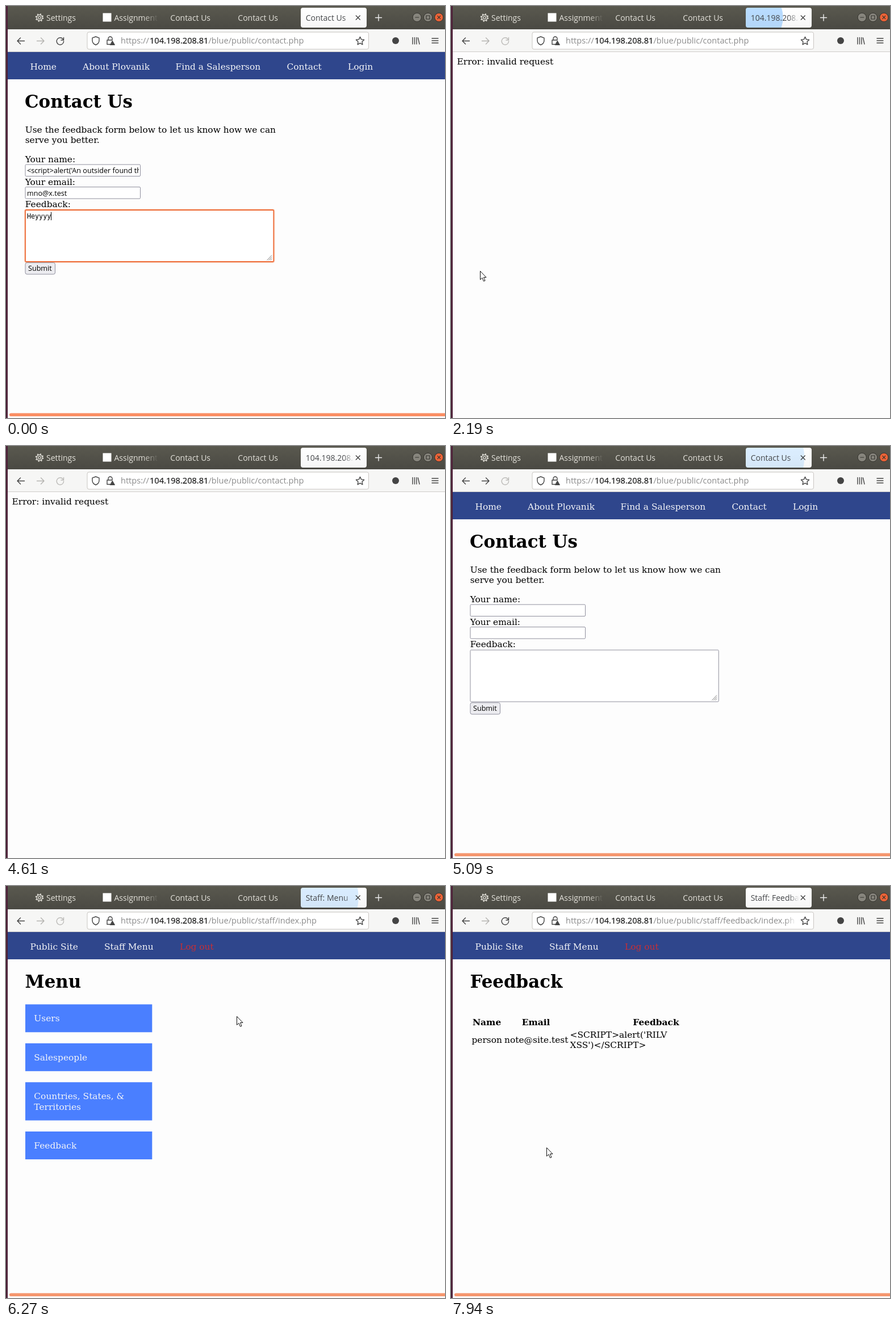
An HTML page for the animation above (8 s loop, 773 by 725 pixels).

```html
<!DOCTYPE html>
<html lang="en">
<head>
<meta charset="utf-8">
<title>Contact form</title>
<style>
  html, body { margin: 0; width: 100%; height: 100%; overflow: hidden; background: #fdfdfd; }
  svg { display: block; }
  .ui { font: 14px "Open Sans", "Noto Sans", sans-serif; }
  .url { font-size: 14.6px; fill: #8b8b8b; }
  .small { font: 12.6px "Open Sans", "Noto Sans", sans-serif; }
  .mono { font: 11.7px "DejaVu Sans Mono", monospace; }
  .page { font: 15.43px "DejaVu Serif", serif; }
  .page .h1 { font-size: 30.87px; font-weight: bold; }
  .b { font-weight: bold; }
  .nav { fill: #f3f4f8; }
  .icon { fill: none; stroke: #444; stroke-width: 1.4; stroke-linecap: round; stroke-linejoin: round; }
  .field { fill: #fff; stroke: #8f8f9d; }
</style>
</head>
<body>
<svg width="773" height="725" viewBox="0 0 773 725">
  <defs>
    <linearGradient id="bar" x2="0" y2="1">
      <stop stop-color="#5a594f"/><stop offset="1" stop-color="#4a4943"/>
    </linearGradient>
    <linearGradient id="tabFill" x2="0" y2="1">
      <stop stop-color="#fff"/><stop offset="1" stop-color="#f6f6f6"/>
    </linearGradient>
    <linearGradient id="fadeA" gradientUnits="userSpaceOnUse" x1="242" x2="268">
      <stop stop-color="#e3e1da"/><stop offset="1" stop-color="#e3e1da" stop-opacity="0"/>
    </linearGradient>
    <linearGradient id="fadeT" gradientUnits="userSpaceOnUse" x1="594" x2="613">
      <stop stop-color="#45474a"/><stop offset="1" stop-color="#45474a" stop-opacity="0"/>
    </linearGradient>
    <linearGradient id="fadeU" gradientUnits="userSpaceOnUse" x1="588" x2="608">
      <stop stop-color="#8b8b8b"/><stop offset="1" stop-color="#8b8b8b" stop-opacity="0"/>
    </linearGradient>
    <clipPath id="tabClip"><rect x="519" y="3" width="116" height="35" rx="4"/></clipPath>
    <clipPath id="nameClip"><rect x="36" y="280" width="198" height="19"/></clipPath>
  </defs>

  <rect width="773" height="725" fill="#fdfdfd"/>

  <!-- pages -->
  <g class="page">
    <rect id="navBar" x="3" y="81" width="770" height="48" fill="#2f468c"/>
    <g id="contact">
      <g class="nav">
        <text x="42.5" y="111.7">Home</text>
        <text x="135" y="111.7">About Plovanik</text>
        <text x="298.5" y="111.7">Find a Salesperson</text>
        <text x="494.5" y="111.7">Contact</text>
        <text x="602" y="111.7">Login</text>
      </g>
      <text class="h1" x="33" y="179.3">Contact Us</text>
      <text x="33.7" y="222.5">Use the feedback form below to let us know how we can</text>
      <text x="33.7" y="241">serve you better.</text>
      <text x="33.7" y="275">Your name:</text>
      <text x="33.7" y="314.5">Your email:</text>
      <text x="33.7" y="354">Feedback:</text>
      <rect class="field" x="34" y="279" width="202.5" height="20.5" rx="1.5"/>
      <rect class="field" x="34" y="318.5" width="202.5" height="20.5" rx="1.5"/>
      <rect id="glow" x="32" y="357" width="441.5" height="95" rx="4" fill="#f9d9c8"/>
      <rect id="area" class="field" x="34" y="359" width="437.3" height="91" rx="1.5"/>
      <path d="M459.5 447.5l8.5-9M462.5 447.5l5.5-6M465.5 447.5l2.5-3" stroke="#777" stroke-width=".9"/>
      <rect id="button" x="34" y="451.7" width="52.5" height="20.3" rx="3" stroke="#8f8f9d"/>
      <text class="small" x="39" y="466.4">Submit</text>
      <g id="entry">
        <text class="small" x="37" y="294" clip-path="url(#nameClip)">&lt;script&gt;alert('An outsider found this</text>
        <text class="small" x="37" y="333.5">mno@x.test</text>
        <text class="mono" x="37" y="374">Heyyyy</text>
        <path id="caret" d="M79.5 362.5V377" stroke="#000"/>
      </g>
    </g>
    <text id="error" x="10.5" y="103">Error: invalid request</text>
    <g id="staffNav" class="nav">
      <text x="42.5" y="111.7">Public Site</text>
      <text x="173" y="111.7">Staff Menu</text>
      <text x="306" y="111.7" fill="#c62f36">Log out</text>
    </g>
    <g id="menu">
      <text class="h1" x="33.5" y="179.3">Menu</text>
      <g fill="#4a7fff">
        <rect x="34" y="208.3" width="223.3" height="49"/>
        <rect x="34" y="276.8" width="223.3" height="49"/>
        <rect x="34" y="345.3" width="223.3" height="67.2"/>
        <rect id="choice" x="34" y="432" width="223.3" height="49"/>
      </g>
      <g class="nav">
        <text x="49.3" y="238.2">Users</text>
        <text x="49.3" y="306.7">Salespeople</text>
        <text x="49.3" y="375">Countries, States, &amp;</text>
        <text x="49.3" y="393.5">Territories</text>
        <text x="49.3" y="462">Feedback</text>
      </g>
    </g>
    <g id="feedback">
      <text class="h1" x="33.5" y="179.3">Feedback</text>
      <g class="b">
        <text x="38" y="244.7">Name</text>
        <text x="124.7" y="244.7">Email</text>
        <text x="320.3" y="244.7">Feedback</text>
      </g>
      <text x="36.5" y="276">person</text>
      <text x="94" y="276">note@site.test</text>
      <text x="209.5" y="267">&lt;SCRIPT&gt;alert('RILV</text>
      <text x="209.5" y="285.3">XSS')&lt;/SCRIPT&gt;</text>
    </g>
    <rect id="scroll" x="6" y="716.5" width="775" height="5.6" rx="2.8"/>
  </g>

  <!-- tab strip -->
  <rect width="773" height="41" fill="url(#bar)"/>
  <g class="ui" fill="#e3e1da">
    <g fill="none" stroke="#dedcd5" stroke-width="1.3">
      <circle cx="59" cy="20.5" r="2.2"/>
      <circle cx="59" cy="20.5" r="5"/>
      <circle cx="59" cy="20.5" r="6.3" stroke-width="2" stroke-dasharray="2.3 2.65"/>
    </g>
    <text x="71" y="25.8">Settings</text>
    <rect x="170.5" y="12.5" width="15" height="15" fill="#fff"/>
    <text x="190.5" y="25.8" fill="url(#fadeA)">Assignment</text>
    <text x="289.3" y="25.8">Contact Us</text>
    <text x="408.3" y="25.8">Contact Us</text>
    <rect x="519" y="3" width="116" height="35" rx="4" fill="url(#tabFill)"/>
    <circle id="burst" cx="528" cy="20" fill="#0a84ff" clip-path="url(#tabClip)"/>
    <text id="title" x="527.7" y="25.8" fill="url(#fadeT)"></text>
  </g>
  <path class="icon" d="M616.3 17l7 7m0-7l-7 7" stroke-width="1.2"/>
  <path class="icon" d="M650.5 20.5h11m-5.5-5.5v11" style="stroke:#eee"/>
  <g stroke="#35342f">
    <circle cx="723.7" cy="20" r="7.6" fill="#87857d"/>
    <circle cx="743" cy="20" r="7.6" fill="#87857d"/>
    <circle cx="762.3" cy="20" r="7.6" fill="#ec6337"/>
    <path d="M720.3 20h7M740 17h6v6h-6zM759.5 17.2l5.6 5.6m0-5.6l-5.6 5.6" fill="none" stroke-width="1.2"/>
  </g>

  <!-- toolbar -->
  <rect y="41" width="773" height="40" fill="#f6f6f5"/>
  <path d="M0 80.5H773" stroke="#cfcdca"/>
  <rect x="143" y="46" width="495.5" height="30" rx="3" fill="#fff" stroke="#c9c6c2"/>
  <rect id="hover" x="80" y="45.5" width="31" height="30.5" rx="3" fill="#dad7d3"/>
  <g class="icon">
    <path d="M32.5 61.5H20m5.5-5.5L20 61.5l5.5 5.5"/>
    <path id="forward" d="M54.5 61.5H67m-5.5-5.5l5.5 5.5-5.5 5.5"/>
    <path id="reload" d="M100.6 58.6A6.2 6.2 0 1 0 101.6 62M101.5 55.5V60H97"/>
    <path d="M158 54l6 2.2v4.3c0 4-3 6.8-6 8-3-1.200-6-4-6-8v-4.300z"/>
    <path d="M180 60v-2.500a3.500 3.500 0 0 1 7 0V60M183 67.500h-5V60h9"/>
    <path d="M187.500 61.500l4 7h-8zM187.500 64.500v1.500" fill="#444" stroke-width="1"/>
    <path d="M623.500 54.300l2.100 4.600 5 .6-3.700 3.400 1 4.900-4.400-2.500-4.400 2.500 1-4.900-3.700-3.400 5-.6z"/>
    <path d="M716 55.500V67m3.500-11.500V67m3.500-11.500V67m2.500-11l2.500 11M750 57h11m-11 4h11m-11 4h11"/>
  </g>
  <circle cx="686" cy="61" r="6" fill="#444"/>
  <g class="ui">
    <text class="url" x="202" y="66.300">https://</text>
    <text class="url" x="253" y="66.300" style="fill:#1c1c1c;stroke:#1c1c1c;stroke-width:.25px">104.198.208.81</text>
    <text id="path" class="url" x="356.500" y="66.300" style="fill:url(#fadeU)"></text>
  </g>

  <rect width="3" height="725" fill="#4d2138"/>
  <path id="cursor" d="M.5 .5V15.500L4 12.300 6.500 18.300 9 17.300 6.500 11.500H11Z" fill="#fff" stroke="#111"/>
</svg>

<script>
const LOOP = 8000;
const $ = id => document.getElementById(id);
const show = (id, on) => $(id).style.display = on ? '' : 'none';
const paint = (id, attr, value) => $(id).setAttribute(attr, value);
const clamp = v => Math.max(0, Math.min(1, v));

// start time, page, tab title, path
const pages = [
  [0, 'contact', 'Contact Us', 'contact.php'],
  [1990, 'error', '104.198.208.', 'contact.php'],
  [4710, 'contact', 'Contact Us', 'contact.php'],
  [5950, 'menu', 'Staff: Menu', 'staff/index.php'],
  [7020, 'feedback', 'Staff: Feedba', 'staff/feedback/index.ph']
];

// click time, time the page has loaded
const loads = [[1650, 2070], [4290, 4865], [5640, 6050], [6980, 7090]];
const BURST = 375, LOCK = 650;

// from, to, x, y, end x, end y
const moves = [
  [720, 1050, 58, 453, 51, 466],
  [1050, 2720, 51, 466, 51, 466],
  [2720, 2910, 51, 466, 59, 131],
  [2910, 3120, 59, 131, 59, 131],
  [3120, 3390, 59, 131, 60, 123],
  [3610, 3720, 90, 73, 94, 66],
  [3870, 4140, 90, 65, 35, 65],
  [4140, 4360, 35, 65, 35, 65],
  [5160, 5500, 530, 126, 536, 108],
  [5900, 6470, 406, 229, 406, 229],
  [6470, 6850, 406, 229, 168, 460],
  [7940, 8000, 168, 460, 168, 460]
];

function draw(t) {
  const [start, page, title, path] = pages.findLast(p => t >= p[0]);
  const staff = page === 'menu' || page === 'feedback';
  for (const id of ['contact', 'error', 'menu', 'feedback']) show(id, id === page);
  show('staffNav', staff);
  show('navBar', page !== 'error');
  show('scroll', page !== 'error');
  $('title').textContent = title;
  $('path').textContent = '/blue/public/' + path;

  // form
  const filled = start === 0, focus = t < 1650;
  show('entry', filled);
  show('caret', t < 1190);
  show('glow', focus);
  $('area').style.cssText = focus ? 'stroke:#ee6c38;stroke-width:1.8px' : '';
  paint('button', 'fill', !filled || t < 720 ? '#ececf0' : t < 1190 ? '#d5d5dc' : '#c6c6ce');
  paint('choice', 'fill', t >= 6800 ? '#3a72e6' : '#4a7fff');
  const calm = clamp((t - 320) / 140);
  paint('scroll', 'fill', `rgb(${250 - 5 * calm},${142 + 8 * calm},${99 + 10 * calm})`);

  // loading
  const busy = loads.some(([a, b]) => t >= a && t < b + LOCK);
  paint('reload', 'stroke', busy ? '#bcbbb8' : '#444');
  paint('forward', 'stroke', start === 4710 ? '#444' : '#b5b4b1');
  const load = loads.find(([, b]) => t >= b && t < b + BURST);
  show('burst', load);
  if (load) {
    const e = 1 - (1 - (t - load[1]) / BURST) ** 1.6;
    paint('burst', 'r', 122 * e);
    paint('burst', 'opacity', .04 + .45 * (1 - e));
  }
  show('hover', t >= 3610 && t < 4000);
  paint('hover', 'opacity', clamp((t - 3540) / 130) * clamp((4000 - t) / 130));

  // pointer
  const move = moves.find(m => t >= m[0] && t < m[1]);
  show('cursor', move);
  if (move) {
    const [a, b, x, y, x2, y2] = move;
    const p = (t - a) / (b - a), e = p * p * (3 - 2 * p);
    paint('cursor', 'transform', `translate(${x + (x2 - x) * e} ${y + (y2 - y) * e})`);
  }
}

const begin = performance.now();
function tick() {
  draw((performance.now() - begin) % LOOP);
  requestAnimationFrame(tick);
}
tick();
</script>
</body>
</html>
```
